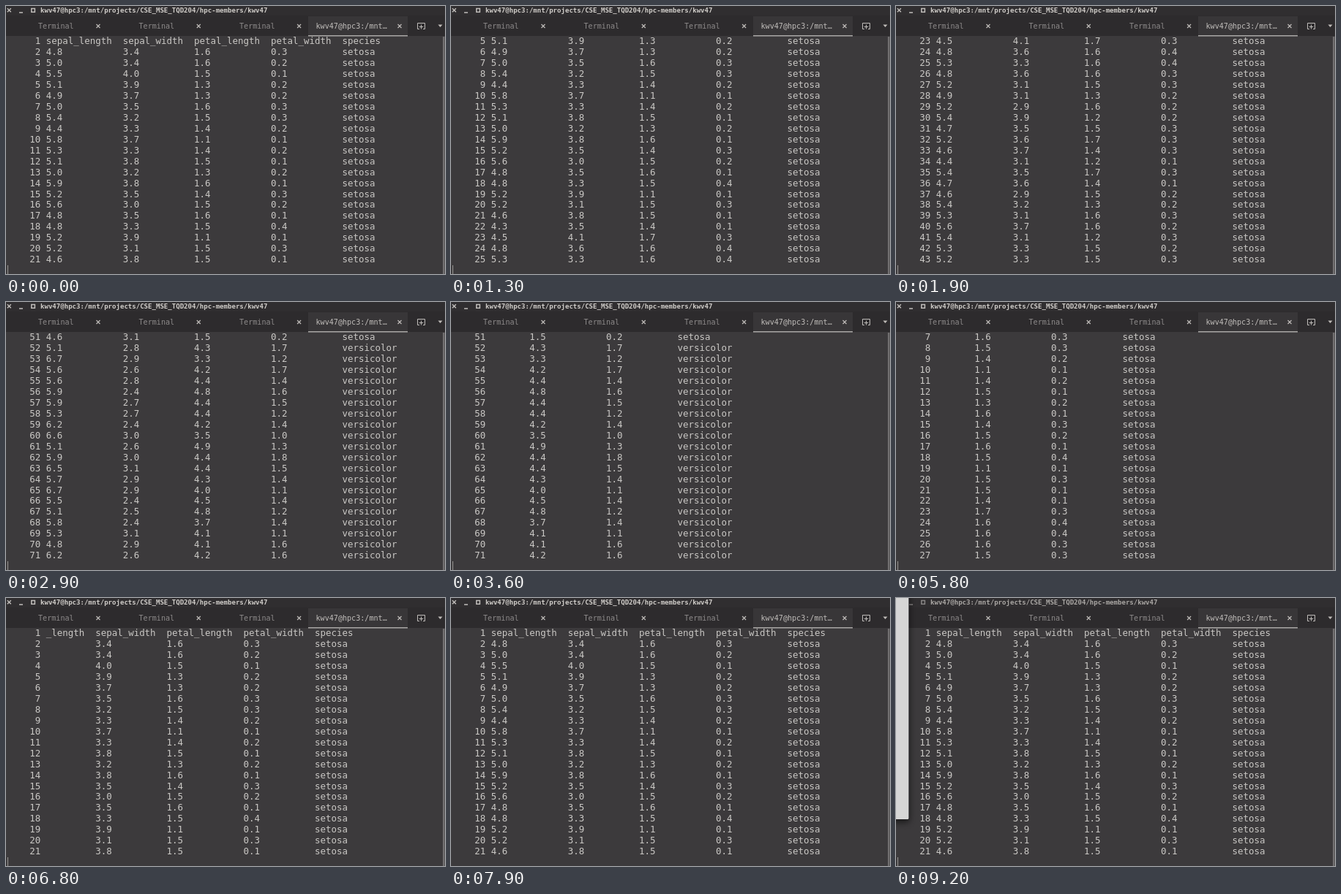
Recreate the animation shown at these times as an HTML page. Size 600 by 367 pixels, loop 9300 ms.

```html
<!DOCTYPE html>
<html lang="en">
<head>
<meta charset="utf-8">
<title>Scrolling a table in a terminal</title>
<style>
  html, body { margin: 0; width: 100%; height: 100%; overflow: hidden; background: #3c3a3c; }
  svg { display: block; width: 600px; height: 367px; }
  text { font-family: "DejaVu Sans Mono", monospace; white-space: pre; }
  #rows { font-size: 12.46px; fill: #cac8c5; }
  .title { font-size: 9.06px; font-weight: bold; fill: #d0cdc9; }
  .tab { font-size: 10.1px; fill: #8d8a8a; }
  .tab.active { fill: #c0bdba; }
  .icon { fill: none; stroke: #c0bdba; }
  .unfocused .title { fill: #aaa7a4; }
  .unfocused #controls { opacity: .6; }
</style>
</head>
<body>
<svg id="stage" viewBox="0 0 600 367">
  <defs>
    <filter id="blur" x="-100%" y="-10%" width="300%" height="120%">
      <feGaussianBlur stdDeviation="4"/>
    </filter>
  </defs>
  <rect width="600" height="367" fill="#3c3a3c"/>
  <rect width="600" height="41" fill="#2d2b2d"/>
  <rect width="600" height="13" fill="#302e30"/>

  <g id="controls" class="icon" stroke-width="1.5">
    <path d="M1.8 3.3l5 5m0-5l-5 5M18 9h5"/>
    <rect x="34.8" y="3.5" width="4.6" height="4.8"/>
  </g>
  <text class="title" x="47" y="9">kwv47@hpc3:/mnt/projects/CSE_MSE_TQD204/hpc-members/kwv47</text>

  <rect x="413" y="14" width="136" height="27" fill="#383638"/>
  <rect x="413" y="40" width="136" height="1.5" fill="#aaa8a6"/>
  <g id="tabs"></g>
  <path class="icon" d="M565 31.5h-2.5v-8h10v8h-2.500M567.500 25.500v6M564.700 28.500h5.600"/>
  <path d="M590.500 25.500h6l-3 3.500z" fill="#c0bdba"/>

  <rect x="597" y="42" width="2.500" height="325" fill="#706e6f"/>
  <g id="rows"></g>
  <rect id="cursor" x="2" y="355" width="1" height="12" fill="#9a9896"/>

  <g id="window">
    <rect x="-20" y="-20" width="38" height="327" fill="#000" opacity=".6" filter="url(#blur)"/>
    <rect x="-5" y="-5" width="22.300" height="308" rx="1.500" fill="#d6d6d5"/>
  </g>
</svg>

<script>
const LOOP = 9300, TICK = 100, VISIBLE_ROWS = 21, ROW_HEIGHT = 14.95;
const KEY_RATE = 0.03; // repeated key presses per ms
const LAST_LINE = 71, SETOSA_COUNT = 50;

// Typical value and spread of each measurement, by species
const columns = [
  { name: "sepal_length", setosa: [5.0, 0.35], versicolor: [5.9, 0.5] },
  { name: "sepal_width", setosa: [3.4, 0.35], versicolor: [2.8, 0.3] },
  { name: "petal_length", setosa: [1.45, 0.15], versicolor: [4.3, 0.45] },
  { name: "petal_width", setosa: [0.22, 0.08], versicolor: [1.35, 0.18] },
];

let seed = 7;
function random() {
  seed = (seed * 16807) % 2147483647;
  return seed / 2147483647;
}
function measure([mean, spread]) {
  const deviation = 2 * (random() + random() + random() - 1.5);
  return Math.max(0.1, mean + spread * deviation).toFixed(1);
}

const formatLine = (cells, species) =>
  cells.map((cell, i) => cell.padEnd(columns[i].name.length + 2)).join("") + species;

const lines = [formatLine(columns.map(column => column.name), "species")];
while (lines.length < LAST_LINE) {
  const species = lines.length <= SETOSA_COUNT ? "setosa" : "versicolor";
  lines.push(formatLine(columns.map(column => measure(column[species])), species));
}

const byId = id => document.getElementById(id);
function addSvg(parent, tag, attributes, content = "") {
  const node = document.createElementNS("http://www.w3.org/2000/svg", tag);
  for (const name in attributes) node.setAttribute(name, attributes[name]);
  node.textContent = content;
  return parent.appendChild(node);
}

function addTab(label, x, closeX, active) {
  addSvg(byId("tabs"), "text", { class: active ? "tab active" : "tab", x, y: 31 }, label);
  addSvg(byId("tabs"), "path", {
    class: "icon", "stroke-width": 1.2, d: `M${closeX - 2.5} 25l5 5m0-5l-5 5`,
  });
}
for (let i = 0; i < 3; i++) addTab("Terminal", 44 + i * 137.5, 126 + i * 137.3);
addTab("kwv47@hpc3:/mnt…", 423.5, 538, true);

const rows = Array.from({ length: VISIBLE_ROWS }, (_, i) =>
  addSvg(byId("rows"), "text", { x: 2.2, y: 52.2 + i * ROW_HEIGHT }));

// Each scroll is one key press, a pause, then key repeat.
function topLine(t) {
  if (t < 600) return 1;
  if (t < 3900) return Math.min(51, Math.round(2 + Math.max(0, t - 1200) * KEY_RATE));
  if (t < 4500) return 50;
  return Math.max(1, Math.round(46 - (t - 4500) * KEY_RATE));
}

// Sideways scrolling: start time and hidden characters
const shifts = [[0, 0], [3000, 5], [3500, 10], [3600, 20], [6200, 15], [6800, 5], [6900, 0]];
const shiftAt = t => shifts.filter(([start]) => start <= t).pop()[1];

const between = (t, start, end) => t >= start && t < end;
const cursorHidden = t =>
  between(t, 500, 600) || between(t, 7800, 8400) || between(t, 9000, 9200);
const show = (id, visible) => byId(id).setAttribute("visibility", visible ? "visible" : "hidden");

function draw(now) {
  const t = Math.floor(now % LOOP / TICK) * TICK;
  const first = topLine(t), shift = shiftAt(t), covered = t >= 9200;
  rows.forEach((row, i) => {
    const number = first + i;
    row.textContent = String(number).padStart(6) + " " + lines[number - 1].slice(shift);
  });
  show("cursor", !cursorHidden(t));
  show("window", covered);
  byId("stage").classList.toggle("unfocused", covered);
}

const startTime = performance.now();
function loop() {
  draw(performance.now() - startTime);
  requestAnimationFrame(loop);
}
loop();
</script>
</body>
</html>
```
